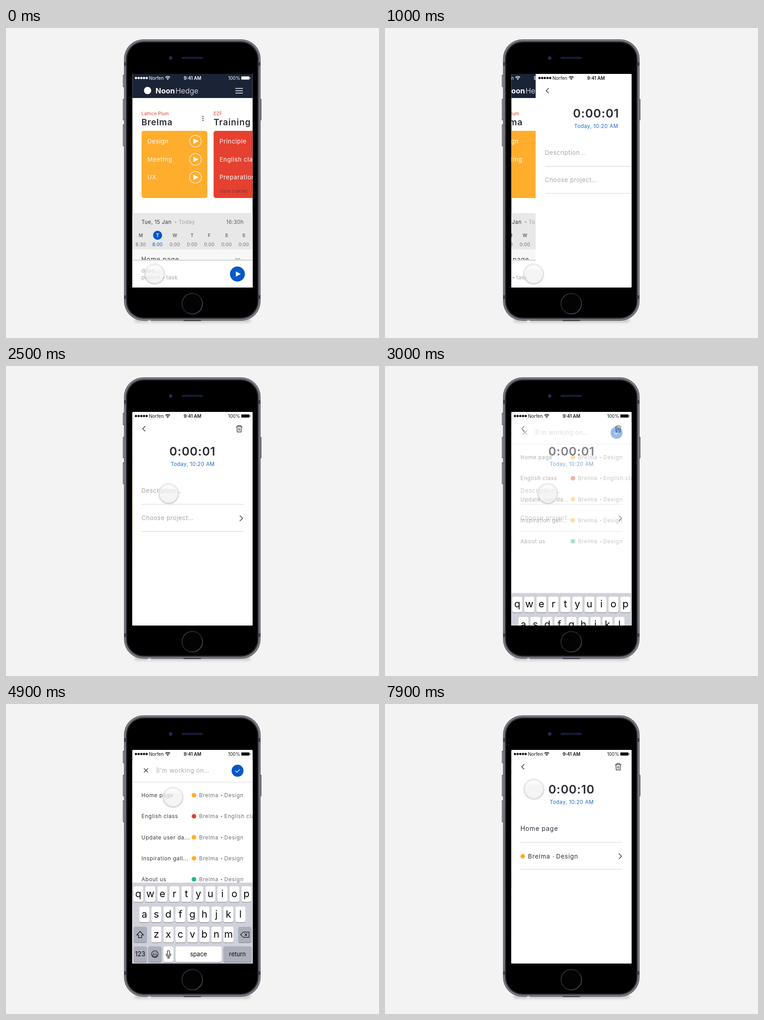
Recreate the animation shown at these times as an HTML page. Size 822 by 682 pixels, loop 8000 ms.

```html
<!DOCTYPE html>
<html lang="en">
<head>
<meta charset="utf-8">
<title>Time tracker</title>
<style>
html, body { margin: 0; width: 100%; height: 100%; overflow: hidden; background: #f3f3f3; }
svg { display: block; width: 822px; height: 682px; font-family: Inter, "Open Sans", sans-serif; }
text { white-space: pre; }
</style>
</head>
<body>
<svg id="stage" viewBox="0 0 822 682"></svg>
<script>
const BLUE = '#0558c9', ORANGE = '#ffad2d', RED = '#e54030', GREEN = '#1cb68e';
const INK = '#2c2c36', GRAY = '#a3a3a3', MID = '#707074';

// Drawing helpers
const text = (x, y, s, size, fill, ls = 0, weight = 400, anchor = 'start') =>
  `<text x="${x}" y="${y}" font-size="${size}" fill="${fill}" letter-spacing="${ls}" font-weight="${weight}" text-anchor="${anchor}">${s}</text>`;
const rect = (x, y, w, h, fill, r = 0, extra = '') =>
  `<rect x="${x}" y="${y}" width="${w}" height="${h}" rx="${r}" fill="${fill}" ${extra}/>`;
const dot = (x, y, r, fill, extra = '') => `<circle cx="${x}" cy="${y}" r="${r}" fill="${fill}" ${extra}/>`;
const line = (d, color, width = 1.5, extra = '') =>
  `<path d="${d}" fill="none" stroke="${color}" stroke-width="${width}" ${extra}/>`;
const shape = (d, fill) => `<path d="${d}" fill="${fill}"/>`;
const group = (id, body) => `<g id="${id}">${body}</g>`;
const each = (list, fn) => list.map(fn).join('');

const defs = `<defs>
  <clipPath id="screen"><rect x="278.5" y="101" width="265" height="470" rx="1.5"/></clipPath>
  <filter id="soft" x="-30%" y="-30%" width="160%" height="160%"><feGaussianBlur stdDeviation="1.3"/></filter>
  <filter id="blur" x="-10%" y="-200%" width="120%" height="500%"><feGaussianBlur stdDeviation="3"/></filter>
  <linearGradient id="glass" x1="0" y1="0" x2="0" y2="1">
    <stop offset="0" stop-color="#fcfcfc" stop-opacity=".62"/>
    <stop offset=".25" stop-color="#f8f8f8" stop-opacity=".66"/>
    <stop offset=".35" stop-color="#f1f1f1" stop-opacity=".72"/>
    <stop offset="1" stop-color="#f2f2f2" stop-opacity=".82"/>
  </linearGradient>
  <linearGradient id="ring" x1="0" y1="0" x2="1" y2="1">
    <stop offset="0" stop-color="#3a3a40"/><stop offset=".5" stop-color="#1e1e2c"/><stop offset="1" stop-color="#55555c"/>
  </linearGradient>
  <linearGradient id="lift" x1="0" y1="0" x2="0" y2="1">
    <stop offset="0" stop-color="#e4e4e4"/><stop offset="1" stop-color="#cdcdcd"/>
  </linearGradient>
</defs>`;

function phone() {
  const button = (x, y, h) => rect(x, y, 3.5, h, '#55565b', 1.2) + rect(x + 1, y + 1.5, 1.4, h - 3, '#a3a4a8');
  // Nested outlines from the rim inwards: inset, colour
  const shells = [[0, '#4a4b50'], [1, '#85868b'], [3, '#5c5d63'], [5, '#2c2d33'], [6.2, '#15161d'], [7.5, '#000']];
  const body = each(shells, ([i, c]) => rect(260 + i, 25 + i, 301 - 2 * i, 619 - 2 * i, c, 43 - i));
  const bands = each([75, 588], y => each([260, 556], x => rect(x, y, 5, 8, '#3f4045')));
  return rect(284, 639, 254, 8, '#9a9a9a', 4, 'filter="url(#blur)" opacity=".6"') +
    button(257.5, 103, 27) + button(257.5, 156, 47) + button(257.5, 212, 48) + button(559.5, 156, 47) +
    body + bands +
    rect(391, 642.5, 39, 2, '#25262b', 1) + dot(316, 646, 4, '#f5f5f5', 'opacity=".5"') +
    dot(363, 66, 4.4, '#141c33') + dot(363, 66, 2.2, '#2846a0') + dot(363.3, 66, 1, '#0a1022') +
    rect(387, 63.2, 47, 5, '#151b30', 2.5) +
    dot(410.5, 606.5, 22.6, '#030304', 'stroke="url(#ring)" stroke-width="2"');
}

function status(c) {
  return each([0, 1, 2, 3, 4], i => dot(286.4 + 5.9 * i, 110, 2.5, c)) +
    text(315, 113.6, 'Norfen', 10, c) +
    line('M351.3 108.6a7.4 7.4 0 0 1 10.2 0M353.2 110.7a4.7 4.7 0 0 1 6.4 0', c, 1.5) +
    shape('M354.6 112.2a2.6 2.6 0 0 1 3.6 0L356.4 114.2Z', c) +
    text(411, 113.6, '9:41 AM', 10, c, 0, 600, 'middle') +
    text(516, 113.6, '100%', 10, c, 0, 400, 'end') +
    rect(518.5, 106.4, 18, 7.2, c, 1.4) + rect(537.2, 108.6, 1.3, 2.8, c, .6);
}

function home() {
  const play = y => dot(417.5, y, 12.9, 'none', 'stroke="#fff" stroke-width="1.1"') +
    shape(`M413 ${y - 6}L424.5 ${y}L413 ${y + 6}Z`, '#fff');
  const rows = [249, 289, 328.5];
  const tasks = (x, names) => each(names, (n, i) => text(x, rows[i] + 4.6, n, 13.2, '#fff', .6));
  const days = each([...'MTWTFSS'], (d, i) => {
    const x = i ? 296 + 38 * i : 297, on = i === 1;
    return (on ? dot(x, 456, 10, BLUE) : '') +
      text(x, 460, d, 10, on ? '#fff' : '#66666a', 0, 600, 'middle') +
      text(x, 479.6, i ? on ? '8:00' : '0:00' : '8:30', 10, on ? BLUE : MID, .3, 400, 'middle');
  });
  return rect(278, 101, 266, 471, '#fff') + rect(278, 101, 266, 53, '#1b2336') + status('#fff') +
    dot(312, 137.5, 8, '#fff') +
    text(329.5, 143.6, 'Noon', 16.3, '#fff', 0, 700) + text(373.5, 143.6, 'Hedge', 16.3, '#fff', 0, 300) +
    each([132.8, 138, 143.2], y => rect(505.5, y - .75, 16.5, 1.5, '#fff')) +
    text(298.5, 191.8, 'Lattice Plum', 10, '#e03c2f', .25) + text(457.5, 191.8, 'EZF', 10, '#e03c2f', .3) +
    text(298.5, 213.6, 'Brelma', 19, INK, .8, 600) + text(457.5, 213.6, 'Training', 19, INK, .9, 600) +
    each([194.7, 199, 203.3], y => dot(434, y, 1.4, '#55555a')) +
    rect(298.7, 226.3, 145, 147.7, ORANGE, 5) + rect(457.5, 226.3, 145, 147.7, RED, 5) +
    tasks(311.5, ['Design', 'Meeting', 'UX']) + each(rows, play) +
    tasks(470.5, ['Principle', 'English class', 'Preparation']) +
    text(471.5, 363, 'VIEW 3 MORE', 9, '#5a2c36', .25, 300) +
    rect(278, 407, 266, 80, '#e8e8e8') + rect(278, 487, 266, 25, '#f7f7f7') +
    text(298.5, 430.8, 'Tue, 15 Jan', 11.5, '#3a3a42', .45) + dot(374, 427, 1.6, GRAY) +
    text(380.5, 430.8, 'Today', 11.5, GRAY, .6) + text(524, 430.8, '16:30h', 11.5, '#58585c', .4, 400, 'end') +
    days +
    text(298.5, 514, 'Home page', 13.8, INK, .85) + text(523, 515, '35s', 10.5, '#58585c', .2, 400, 'end') +
    rect(278, 509.5, 266, 2.5, 'url(#lift)') + rect(278, 512, 266, 60, '#fff') +
    text(298.5, 537.6, 'desc…', 12, GRAY, .45) + text(298.5, 553.2, 'project', 12, GRAY, .45) +
    dot(347, 549.6, 1.6, GRAY) + text(353, 553.2, 'task', 12, GRAY, .45) +
    dot(510, 541.3, 16.5, BLUE) + shape('M506.5 535.5L517.2 541.3L506.5 547.2Z', '#fff');
}

function detail() {
  const trash = line('M507 133.5H521M511 133.3V130.8H517V133.3M508.7 134L509.6 145.3H518.4L519.3 134', '#48484c', 1.4) +
    line('M512 136.5V142.5M514 136.5V142.5M516 136.5V142.5', '#48484c', 1);
  return rect(278, 101, 266, 471, '#fff') + status('#111') +
    line('M306.8 132.4L301.2 138L306.8 143.6', '#48484c', 1.6) + trash +
    `<text id="timer" x="411" y="197" font-size="26" font-weight="600" letter-spacing=".8" text-anchor="middle" fill="${INK}"></text>` +
    text(411.5, 219.6, 'Today, 10:20 AM', 11.3, '#1b66bf', .55, 400, 'middle') +
    rect(298.5, 303.7, 225, 1, '#d2d2d2') + rect(298.5, 363.4, 225, 1, '#d2d2d2') +
    line('M515.3 329L521.3 335L515.3 341', '#48484c', 1.7) +
    group('empty', text(298.5, 279.2, 'Description…', 13, GRAY, .6) + text(298.5, 339, 'Choose project…', 13, GRAY, .65)) +
    group('filled', text(298.5, 279.2, 'Home page', 13.8, INK, .85) + dot(303.5, 335, 5, ORANGE) +
      text(315, 339.8, 'Brelma', 13.4, INK, .9) + dot(371, 335.5, 1.3, GRAY) + text(377, 339.8, 'Design', 13.4, INK, .8));
}

function search() {
  const rows = [
    ['Home page', ORANGE, 'Design'], ['English class', RED, 'English class'], ['Update user da...', ORANGE, 'Design'],
    ['Inspiration gall...', ORANGE, 'Design'], ['About us', GREEN, 'Design']];
  return rect(278, 124, 266, 448, '#fff') +
    line('M304 141.5L313 150.5M313 141.5L304 150.5', '#48484c', 1.7) +
    rect(332.6, 139, 1, 13, '#9c9ca0') + text(335, 150.6, "I'm working on…", 13, '#a8a8a8', .75) +
    dot(510.3, 146.8, 13.2, BLUE) + line('M505.6 147L509 150.2L515.2 143.8', '#fff', 1.3) +
    rect(278, 170.8, 266, 2.2, '#ebebeb') +
    each(rows, ([name, color, task], i) => {
      const y = 201 + 46.25 * i;
      return text(298.5, y + 4.2, name, 11.8, '#3a3a42', .65) + dot(414.2, y - .3, 5, color) +
        text(425.5, y + 4.2, 'Brelma', 11.8, MID, .7) + dot(475, y + .2, 1.3, MID) +
        text(481, y + 4.2, task, 11.8, MID, .65);
    });
}

function keyboard() {
  const key = (x, y, w, fill = '#fff') => rect(x, y + 1, w, 34.7, '#888b91', 4) + rect(x, y, w, 34.5, fill, 4);
  const dark = '#abb0ba';
  const letters = (chars, x, y) => each([...chars], (c, i) => {
    const cx = x + 26.48 * i;
    return key(cx - 11.1, y, 22.2) + text(cx, y + 24, c, 22, '#0a0a0a', 0, 400, 'middle');
  });
  return rect(278, 393, 266, 179, '#d0d1da') +
    letters('qwertyuiop', 291.6, 401) + letters('asdfghjkl', 304.9, 445.5) + letters('zxcvbnm', 331.4, 490) +
    key(281, 490, 29.3, dark) + key(511.8, 490, 29.3, dark) +
    line('M295.6 500.3L303.2 508.2H299.2V514.2H292V508.2H288Z', '#111', 1.3, 'stroke-linejoin="round"') +
    line('M517 507.5L523 501.6H535.5V513.4H523ZM525.8 504.6L531.6 510.4M531.6 504.6L525.8 510.4', '#111', 1.2, 'stroke-linejoin="round"') +
    key(281, 533.3, 29.3, dark) + key(313.5, 533.3, 29.3, dark) + key(347, 533.3, 22.2) +
    key(373.5, 533.3, 101.7) + key(479.3, 533.3, 62, dark) +
    text(295.6, 555, '123', 14, '#0a0a0a', 0, 400, 'middle') +
    text(424.3, 554.5, 'space', 13, '#0a0a0a', 0, 400, 'middle') +
    text(510, 554.5, 'return', 13, '#0a0a0a', 0, 400, 'middle') +
    dot(328, 550.3, 7.4, 'none', 'stroke="#111" stroke-width="1.2"') +
    dot(325.4, 548, 1.1, '#111') + dot(330.6, 548, 1.1, '#111') +
    line('M323.2 551.5H332.8A4.8 4.4 0 0 1 323.2 551.5Z', '#111', 1.1) +
    rect(355.6, 542.5, 5, 10.5, 'none', 2.5, 'stroke="#111" stroke-width="1.2"') +
    line('M353 549V551A5.1 5 0 0 0 363.2 551V549M358.1 556V558.8M355 558.8H361.2', '#111', 1.2);
}

const cursor = dot(0, 1.6, 21.3, 'none', 'stroke="#777" stroke-width="1.6" filter="url(#soft)" opacity=".6"') +
  dot(0, 0, 21.3, 'url(#glass)', 'stroke="#e2e2e2" stroke-width=".7"');

document.getElementById('stage').innerHTML = defs + rect(0, 0, 822, 682, '#f3f3f3') + phone() +
  `<g clip-path="url(#screen)">${group('home', home())}${group('detail', detail())}` +
  `${group('search', search())}${group('keys', keyboard())}</g>` + group('cursor', cursor);

// Timing
const $ = id => document.getElementById(id);
const part = (t, start, length) => Math.min(1, Math.max(0, (t - start) / length));
const cubic = p => p < .5 ? 4 * p ** 3 : 1 - 4 * (1 - p) ** 3;
const curve = (u, a, b) => 3 * u * (1 - u) ** 2 * a + 3 * u * u * (1 - u) * b + u ** 3;

// cubic-bezier(.25, .1, .25, 1)
function ease(p) {
  let lo = 0, hi = 1;
  for (let i = 0; i < 24; i++) {
    const u = (lo + hi) / 2;
    if (curve(u, .25, .25) < p) lo = u; else hi = u;
  }
  return p <= 0 ? 0 : p >= 1 ? 1 : curve(lo, .1, 1);
}

// Each move: start, length, from, bend, to
const moves = [
  [1300, 1200, [327.5, 540], [402, 425], [358.5, 279.5]],
  [3700, 1000, [358.5, 279.5], [363, 242], [368, 204]],
  [7300, 1500, [368, 204], [339, 191], [309.4, 177.6]]];

function pointer(t) {
  const [start, length, a, b, c] = moves.filter(m => m[0] <= t).pop() || moves[0];
  const s = ease(part(t, start, length));
  return a.map((v, i) => (1 - s) ** 2 * v + 2 * s * (1 - s) * b[i] + s * s * c[i]);
}

function shift(id, x, y) { $(id).setAttribute('transform', `translate(${x} ${y})`); }

function draw() {
  const t = Math.floor(performance.now() % 8000 / 100) * 100;
  const slide = cubic(part(t, 0, 1588));
  const open = ease(part(t, 2850, 600)) - ease(part(t, 5000, 800));
  const done = t > 4200;
  shift('home', -80 * slide, 0);
  shift('detail', 266 * (1 - slide), 0);
  $('search').setAttribute('opacity', open);
  shift('keys', 0, 180 * (1 - open));
  $('timer').textContent = done ? '0:00:10' : '0:00:01';
  $('empty').setAttribute('opacity', done ? 0 : 1);
  $('filled').setAttribute('opacity', done ? 1 : 0);
  shift('cursor', ...pointer(t));
  requestAnimationFrame(draw);
}
draw();
</script>
</body>
</html>
```
